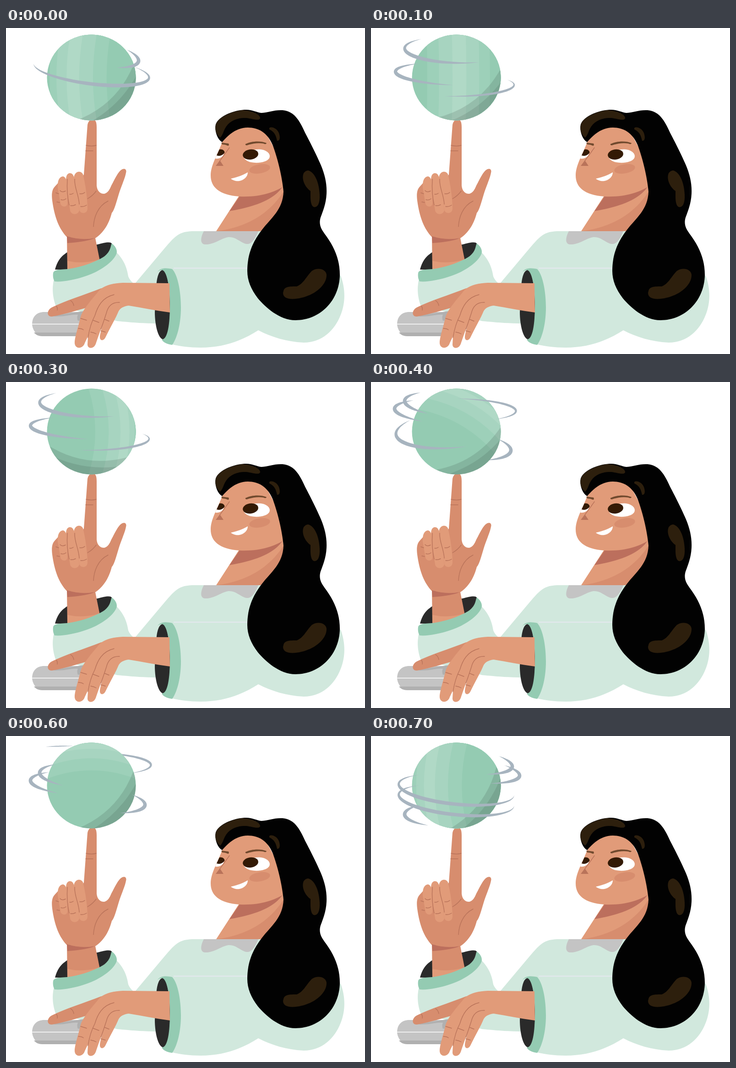
An HTML page for the animation above (800 ms loop, 784 px wide and 714 px high).

```html
<!DOCTYPE html>
<html lang="en">
<head>
<meta charset="utf-8">
<title>Spinning globe</title>
<style>
  html, body { margin: 0; width: 100%; height: 100%; overflow: hidden; background: #fff; }
  svg { display: block; width: 784px; height: 714px; }
  .skin { fill: #e19b79; }
  .tan { fill: #d78d6e; }
  .deep { fill: #bc6f5d; }
  .mint { fill: #d1e8dd; }
  .cuff { fill: #94cbb2; }
  .dark { fill: #2a2a2a; }
  .gray { fill: #c4c4c4; }
  .hair { fill: #020202; }
  .shine { fill: #2d1f0d; }
  .line { fill: none; stroke: #b9735a; stroke-width: 1.4; stroke-linecap: round; }
  .ring { fill: #a7b4bf; }
</style>
</head>
<body>
<svg viewBox="0 0 784 714">
  <defs><clipPath id="disc"><ellipse rx="97" ry="94"/></clipPath></defs>

  <!-- body -->
  <path class="mint" d="M283 558L340 490C370 455 376 445 412 445H557L731 543C741 570 742 600 731 628C718 662 690 689 650 689C612 687 580 677 551 662C515 685 475 700 425 700C400 700 380 697 363 693L327 647C300 647 275 645 243 642L108 607C101 585 101 570 104 553L240 490C258 508 264 525 267 544Q270 552 278 559Z"/>
  <path d="M366 526H530" stroke="#e2e8ec" stroke-width="2.5"/>
  <path class="gray" d="M432 445H551C545 460 537 474 526 473C512 471 503 457 486 458C470 460 455 475 434 474C424 473 424 460 432 445Z"/>

  <!-- raised hand -->
  <path class="dark" d="M107 529C112 510 120 500 134 491L200 474C215 470 228 467 231 472C234 482 222 503 205 510L134 530Z"/>
  <path class="tan" d="M133 455H194L205 510C185 522 160 528 134 530Z"/>
  <path class="skin" d="M134 510Q168 518 204 507L206 512Q175 526 134 530Z"/>
  <path class="tan" d="M178 212C180 202 186 200 190 200C197 201 198 209 198 218V345C199 358 207 364 215 363C222 361 226 355 230 345C236 335 245 312 255 309C260 307 264 311 262 317C260 330 250 350 246 365C240 385 236 400 231 405C226 425 215 448 194 461C175 466 150 462 133 458C116 440 106 415 101 378C99 362 101 354 106 348L115 338L160 335L170 321Z"/>
  <path class="deep" d="M133 456Q165 466 194 460Q178 468 134 471Z"/>
  <path class="skin" d="M113 350C112 335 116 326 124 325C133 325 134 345 135 360L134 385C133 393 122 393 119 385Z"/>
  <path class="skin" d="M132 345C129 325 133 318 140 318C148 318 150 330 152 345L160 400C157 410 143 410 140 400Z"/>
  <path class="skin" d="M148 335C146 314 162 310 168 320C172 335 178 370 178 395C178 408 162 408 160 398L150 345Z"/>
  <path class="line" d="M134 331Q132 362 138 388M150 331C149 350 159 365 160 386M118 356Q122 361 130 357M120 376Q126 378 131 374M139 364Q143 365 147 362M141 389Q146 390 152 387M161 363Q168 364 172 360M163 391Q170 392 176 388M109 361L115 363M111 381L117 382M223 379C200 390 192 415 191 435M178 374Q190 367 197 357M175 257Q187 260 197 257M174 269H190"/>
  <path class="cuff" d="M103 537C104 531 110 529 134 528C170 523 200 510 215 500C230 488 228 476 231 472C240 478 244 488 241 495C233 515 200 535 175 543C150 552 120 557 106 555C103 550 102 543 103 537Z"/>

  <!-- mouse and resting hand -->
  <path class="gray" d="M57 649C57 632 67 622 84 622H172L166 645L157 675H80C65 674 58 660 57 649Z"/>
  <path fill="#b0b0b0" d="M61 667H160L157 675H80C71 675 65 672 61 667ZM97 631L170 620L166 641H157Q154 634 157 628C140 626 130 634 97 631Z"/>
  <path d="M57 648.5H164" stroke="#fff" stroke-width="1.5"/>
  <path class="dark" d="M328 575C328 550 333 531 342 530C350 532 357 558 358 600C359 640 356 682 343 682C332 680 325 650 325 622Z"/>
  <path class="cuff" d="M331 534C337 525 350 525 363 528C376 542 382 580 382 612C382 645 375 677 363 694C350 692 343 688 340 682C353 683 358 650 358 605C358 560 350 530 340 530Q334 531 331 534Z"/>
  <path class="tan" d="M100 632C88 632 89 618 100 612C130 597 170 585 208 570L230 575L178 612C155 618 130 627 100 632Z"/>
  <path class="skin" d="M357 559L358 623C325 619 295 612 268 608C258 609 250 613 246 620C240 635 228 655 218 676C214 686 205 686 205 677C205 672 208 660 211 650C205 665 200 680 196 692C191 704 178 703 178 693L179 675L172 690C169 702 152 705 150 691C149 680 158 655 163 632C169 615 187 595 205 573C218 562 236 559 255 558Z"/>
  <path class="line" d="M236 584C210 590 200 610 194 630C186 645 182 660 179 678M248 601C230 600 222 612 219 625C214 640 211 650 207 660M141 597Q147 601 148 608M110 609Q113 613 112 618M163 636L176 640M158 658Q165 658 169 661M190 640L203 645M185 666Q192 667 197 670M215 638L225 642M207 663L217 666"/>

  <!-- head -->
  <path class="skin" d="M510 366L459 445H560L610 390L604 340Z"/>
  <path class="tan" d="M459 445H560L608 390L605 360C575 405 530 436 459 445Z"/>
  <path class="deep" d="M512 366C550 370 585 358 605 346C588 374 548 391 488 401Z"/>
  <path class="skin" d="M472 250C462 278 447 300 447 323C447 348 465 366 510 369C555 371 585 360 606 347L600 290L560 216H500Z"/>
  <path class="hair" d="M472 250C460 243 455 222 458 211C465 192 500 179 524 179C539 179 547 185 558 186C574 185 585 179 604 180C633 182 644 210 655 233C665 252 679 280 688 301C697 323 701 342 700 363C699 385 692 401 687 415C682 432 690 442 696 451C714 475 729 503 729 541C728 597 686 640 632 640C597 640 566 611 550 592C535 572 527 553 527 532C527 490 543 463 559 442C578 417 605 398 606 358C603 325 593 285 583 258C572 230 552 218 528 218C505 218 487 232 472 250Z"/>
  <path class="shine" d="M468 240C456 232 455 215 461 206C472 190 505 180 520 180C540 182 556 190 555 198C552 204 540 199 525 197C500 196 483 207 476 225Q472 236 468 240Z"/>
  <path class="shine" d="M575 219C580 215 592 220 596 230C600 242 597 248 592 247C590 238 588 228 575 222Z"/>
  <path class="shine" d="M660 312C675 316 684 340 685 365C686 385 680 394 672 392C664 388 665 370 665 357C652 348 645 330 650 318Q654 312 660 312Z"/>
  <path class="shine" d="M606 576C608 566 620 566 635 566C650 560 655 545 668 532C680 524 698 527 700 540C701 560 680 580 655 588C635 595 605 598 605 580Z"/>
  <path fill="#714a2e" d="M523 254C535 248 555 246 569 252Q568 256 562 253C550 251 538 253 526 257Q522 257 523 254ZM470 251L486 253Q488 257 485 258Q479 255 472 255Z"/>
  <path fill="#fff" d="M519 278C530 266 550 264 562 267C574 271 578 278 575 285C570 294 550 297 535 294C525 292 517 285 519 278ZM476 275C474 283 466 287 457 286L460 279Z"/>
  <ellipse cx="534" cy="277" rx="17" ry="11" transform="rotate(-8 534 277)" fill="#331a05"/>
  <path fill="#331a05" d="M466 266C475 264 480 272 476 275C471 280 465 281 460 279Z"/>
  <path class="line" d="M488 262L467 291"/>
  <path fill="#b9735a" d="M467 290L475 302H458Z"/>
  <ellipse class="tan" cx="554" cy="308.5" rx="23" ry="10" transform="rotate(-10 554 308.5)"/>
  <path fill="#fff" d="M491 330C505 327 518 322 528 316C528 328 515 337 502 335Q494 333 491 330Z"/>

  <!-- globe, drawn around its own centre -->
  <g id="globe" transform="translate(186.5 108.5)"></g>
</svg>
<script>
const TONES = ['#94cbb2', '#9dd0b9', '#a7d4c0', '#b0d9c6'];
const STEP = 100, STEPS = 8;
const RADIUS = 97, STRIPE = 18;
const globe = document.getElementById('globe');
const rad = deg => deg * Math.PI / 180;

// linear interpolation through [step, value] keys
function keyed(step, keys) {
  const i = keys.findIndex(k => k[0] >= step);
  if (i === 0) return keys[0][1];
  const [a, from] = keys[i - 1], [b, to] = keys[i];
  return from + (to - from) * (step - a) / (b - a);
}

const lightAt = step => keyed(step, [[0, -25], [2, 33], [3, 50], [6, 65], [7, -38]]);
const rollAt = step => keyed(step, [[0, 0], [3, 0], [4, -60], [6, -90], [7, 0]]);
const shadeAt = step => keyed(step, [[0, 45], [2, 60], [3, 98], [4, 57], [7, 37]]);

// everything to the right of a bowed vertical edge
const beyond = (x, bow, fill, opacity = 1) =>
  `<path d="M${x + bow} -110Q${x - bow} 0 ${x + bow} 110H300V-110Z" fill="${fill}" fill-opacity="${opacity}"/>`;

// meridian stripes, fading in tone away from the lit longitude
function stripes(light) {
  let out = `<circle r="110" fill="${TONES[0]}"/>`;
  for (let k = -2; k <= 3; k++) {
    const lon = light + (k - 0.5) * STRIPE;
    if (lon > 85) break;
    const x = RADIUS * Math.sin(rad(Math.max(lon, -90)));
    out += beyond(x, -26 * Math.sin(rad(light)), TONES[3 - Math.abs(k)]);
  }
  return out;
}

const ball = step => `<g clip-path="url(#disc)">
  <g transform="rotate(${rollAt(step)})">${stripes(lightAt(step))}</g>
  <g transform="rotate(${shadeAt(step)})">${beyond(63, -30, '#000', 0.11)}${beyond(77, -24, '#000', 0.09)}</g>
</g>`;

// a tapered arc of a slanted orbit; 0 is right, 90 front, 180 left
function streak({ y, r, from, to, ry = 29, slant = 8, w = 8 }) {
  const n = 50, outer = [], inner = [];
  for (let i = 0; i <= n; i++) {
    const a = rad(from + (to - from) * i / n), c = Math.cos(a), s = Math.sin(a);
    const px = r * c, py = y + ry * s + slant * c;
    const dx = -r * s, dy = ry * c - slant * s, len = Math.hypot(dx, dy);
    const h = w / 2 * Math.sin(Math.PI * i / n);
    const nx = dy / len * h, ny = -dx / len * h;
    outer.push(`${(px + nx).toFixed(1)} ${(py + ny).toFixed(1)}`);
    inner.unshift(`${(px - nx).toFixed(1)} ${(py - ny).toFixed(1)}`);
  }
  return `<path class="ring" d="M${[...outer, ...inner].join('L')}Z"/>`;
}

const leftHook = (y, r, more) => ({ y, r, from: 226, to: 123, ...more });
const rightHook = (y, r, more) => ({ y, r, from: -41, to: 58, ...more });
const topRight = { y: -47, r: 130, from: -90, to: 49, ry: 25, slant: 2, w: 5 };

const single = [
  { y: -15, r: 126, from: 180, to: -43, slant: 15 },
  rightHook(-57, 103, { slant: 20 })
];
const burst = [
  leftHook(-59, 113),
  leftHook(-42, 135),
  { y: -7, r: 132, from: 220, to: 80, ry: 42, slant: -12 },
  topRight,
  rightHook(28, 119, { slant: 13, ry: 33, back: true })
];
const sweep = [
  { y: -61, r: 113, from: 227, to: 64, slant: 3 },
  { y: -8, r: 133, from: 232, to: 93, ry: 25, slant: 5 },
  { y: 17, r: 126, from: -28, to: 102, ry: 24, slant: -1, w: 5 }
];
const drift = [
  { y: -82, r: 126, from: 218, to: 252, ry: 5, slant: 0, w: 2 },
  leftHook(-20, 113),
  leftHook(-3, 133),
  { ...topRight, back: true },
  rightHook(29, 117, { slant: 13 })
];
const whirl = [
  rightHook(-57, 122, { slant: 15 }),
  rightHook(-37, 138, { slant: 15 }),
  ...[9, 32].map(y => ({ y, r: 126, from: 230, to: 0, ry: 32, slant: 12 })),
  leftHook(63, 113, { slant: 0 })
];
const ringsAt = [single, sweep, burst, sweep, burst, sweep, drift, whirl];

function draw(step) {
  const streaks = back => ringsAt[step].filter(r => !!r.back === back).map(streak).join('');
  globe.innerHTML = streaks(true) + ball(step) + streaks(false);
}

let shown = -1;
function tick(now) {
  const step = Math.floor(now / STEP) % STEPS;
  if (step !== shown) draw(shown = step);
  requestAnimationFrame(tick);
}
draw(shown = 0);
requestAnimationFrame(tick);
</script>
</body>
</html>
```
